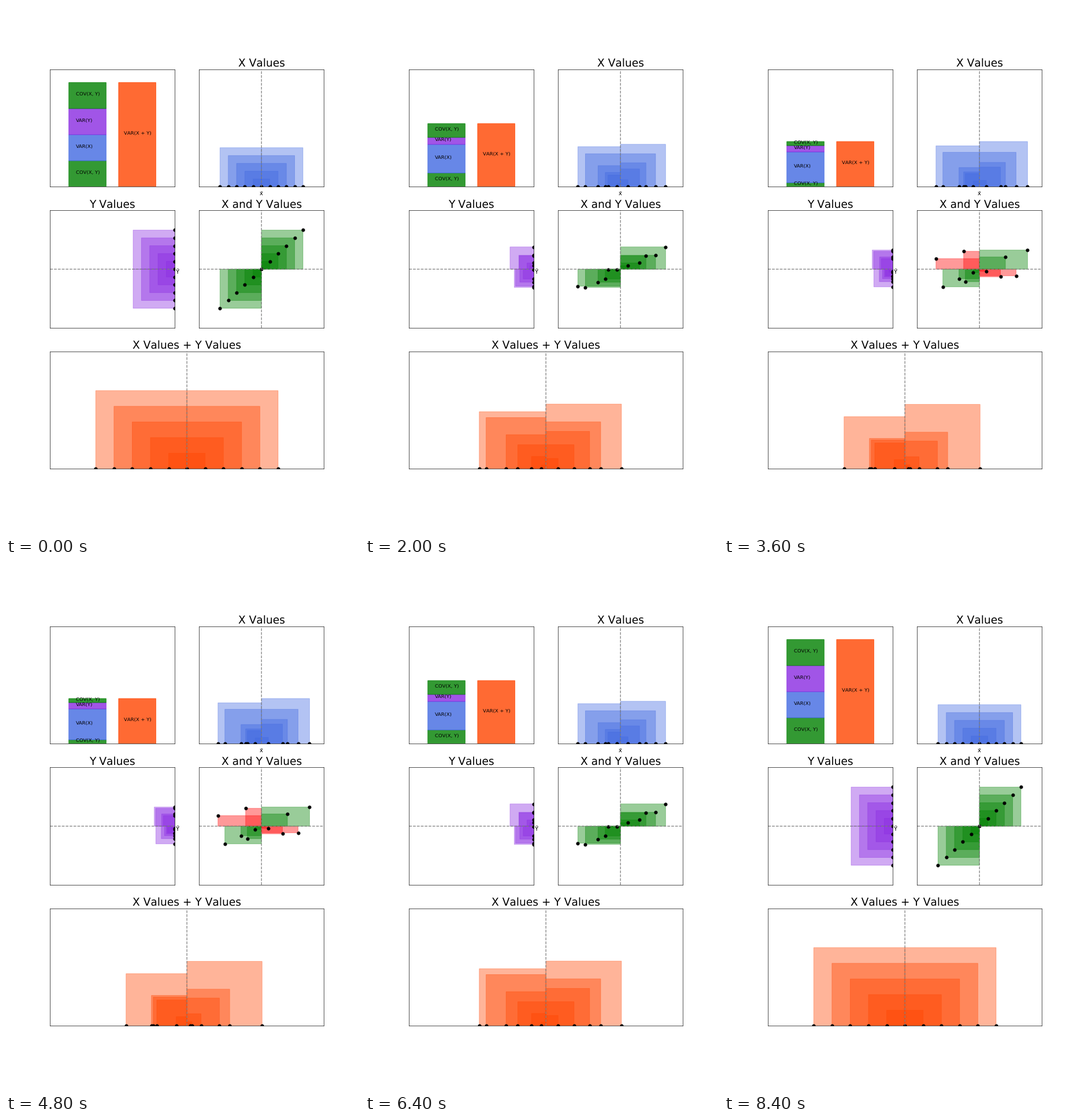
A matplotlib script that plays this animation: 611x917 px, repeating every 8800 ms.

```python
import numpy as np
import matplotlib.pyplot as plt
from matplotlib.animation import FuncAnimation
from matplotlib.patches import Rectangle

DPI = 61.1
STEPS = 10
BLUE, VIOLET, GREEN, ORANGE, RED = (
    "royalblue", "blueviolet", "green", "orangered", "red")

BASE = np.arange(-5, 6)
X_DRIFT = np.array([-.27, -.46, .59, .33, -1.01, -.84, -.19, .59, .14, .46, .88])
Y_NOISE = np.array([1.85, -1.86, -.92, -1.40, 2.39, -.42, -.38, -1.18, 1.265,
                    -1.25, 1.95])

# Unkerned, unhinted text and no pixel snapping of shapes.
plt.rcParams.update({"font.family": "DejaVu Sans", "text.kerning_factor": 6,
                     "text.hinting": "none"})


def noise_level(t):
    return t ** 1.6 / (1.23 - t) / 2.56


def values(step):
    """X drifts steadily while Y loses its link to X and gains noise."""
    t = step / STEPS
    x = BASE + t * X_DRIFT
    y = (1 - t) * BASE + noise_level(t) * Y_NOISE
    return x, y


fig = plt.figure(figsize=((611 + 1e-6) / DPI, (917 + 1e-6) / DPI), dpi=DPI,
                 facecolor="white")
grid = fig.add_gridspec(3, 2, left=.125, right=.9, bottom=.125, top=.88,
                        wspace=.198, hspace=.2016)


def panel(cell, xlim, ylim, title=""):
    ax = fig.add_subplot(cell)
    ax.set(xlim=xlim, ylim=ylim, xticks=[], yticks=[])
    ax.set_title(title, fontsize=22)
    return ax


def block(ax, color, alpha, left=0, width=0):
    return ax.add_patch(Rectangle((left, 0), width, 0, color=color,
                                  alpha=alpha, lw=1, snap=False))


def squares(ax, color):
    return [block(ax, color, .4) for _ in BASE]


def dots(ax):
    return ax.scatter(BASE, BASE, s=38, color="black", zorder=1.5, snap=False)


def mean_line(draw_line):
    draw_line(0, color="gray", ls="--", lw=1.5, zorder=2, snap=False)


SPAN = (-7.5, 7.5)
ax_bar = panel(grid[0, 0], (0, 10), (0, 45))
ax_x = panel(grid[0, 1], SPAN, (0, 15), "X Values")
ax_y = panel(grid[1, 0], (-15, 0), SPAN, "Y Values")
ax_xy = panel(grid[1, 1], SPAN, SPAN, "X and Y Values")
ax_sum = panel(grid[2, :], (-15, 15), (0, 15), "X Values + Y Values")

for ax in (ax_x, ax_xy, ax_sum):
    mean_line(ax.axvline)
for ax in (ax_y, ax_xy):
    mean_line(ax.axhline)

ax_x.text(0, -1.12, r"$\mathrm{\bar{x}}$", fontsize=12, ha="center")
ax_y.text(.4, -.68, r"$\mathrm{\bar{Y}}$", fontsize=12, ha="center")

x_sq, y_sq = squares(ax_x, BLUE), squares(ax_y, VIOLET)
xy_sq, sum_sq = squares(ax_xy, GREEN), squares(ax_sum, ORANGE)
x_dots, y_dots, xy_dots, sum_dots = map(dots, (ax_x, ax_y, ax_xy, ax_sum))


def bar(left, text_x, color, label):
    return (block(ax_bar, color, .8, left, 3),
            ax_bar.text(text_x, 0, label, fontsize=10))


stack = [bar(1.5, 2.07, c, s) for c, s in (
    (GREEN, "COV(X, Y)"), (BLUE, "VAR(X)"),
    (VIOLET, "VAR(Y)"), (GREEN, "COV(X, Y)"))]
total = bar(5.5, 5.93, ORANGE, "VAR(X + Y)")


def set_bar(item, bottom, height):
    rect, label = item
    rect.set_y(bottom)
    rect.set_height(height)
    label.set_y(bottom + height / 2)


def draw(n):
    x, y = values(min(n, 2 * STEPS + 1 - n))
    s = x + y
    zero = np.zeros_like(x)

    cov = np.cov(x, y, bias=True)[0, 1]
    bottom = 0
    for item, height in zip(stack, (cov, x.var(), y.var(), cov)):
        set_bar(item, bottom, height)
        bottom += height
    set_bar(total, 0, s.var())

    for i, (a, b, c) in enumerate(zip(x, y, s)):
        x_sq[i].set_bounds(0, 0, a, abs(a))
        y_sq[i].set_bounds(0, 0, -abs(b), b)
        xy_sq[i].set_bounds(0, 0, a, b)
        xy_sq[i].set_color(GREEN if a * b >= 0 else RED)
        sum_sq[i].set_bounds(0, 0, c, abs(c))

    for pts, u, v in ((x_dots, x, zero), (y_dots, zero, y),
                      (xy_dots, x, y), (sum_dots, s, zero)):
        pts.set_offsets(np.column_stack((u, v)))
    return []


anim = FuncAnimation(fig, draw, frames=2 * STEPS + 2, interval=400,
                     init_func=lambda: draw(0), repeat=True, repeat_delay=0)
plt.show()
```
